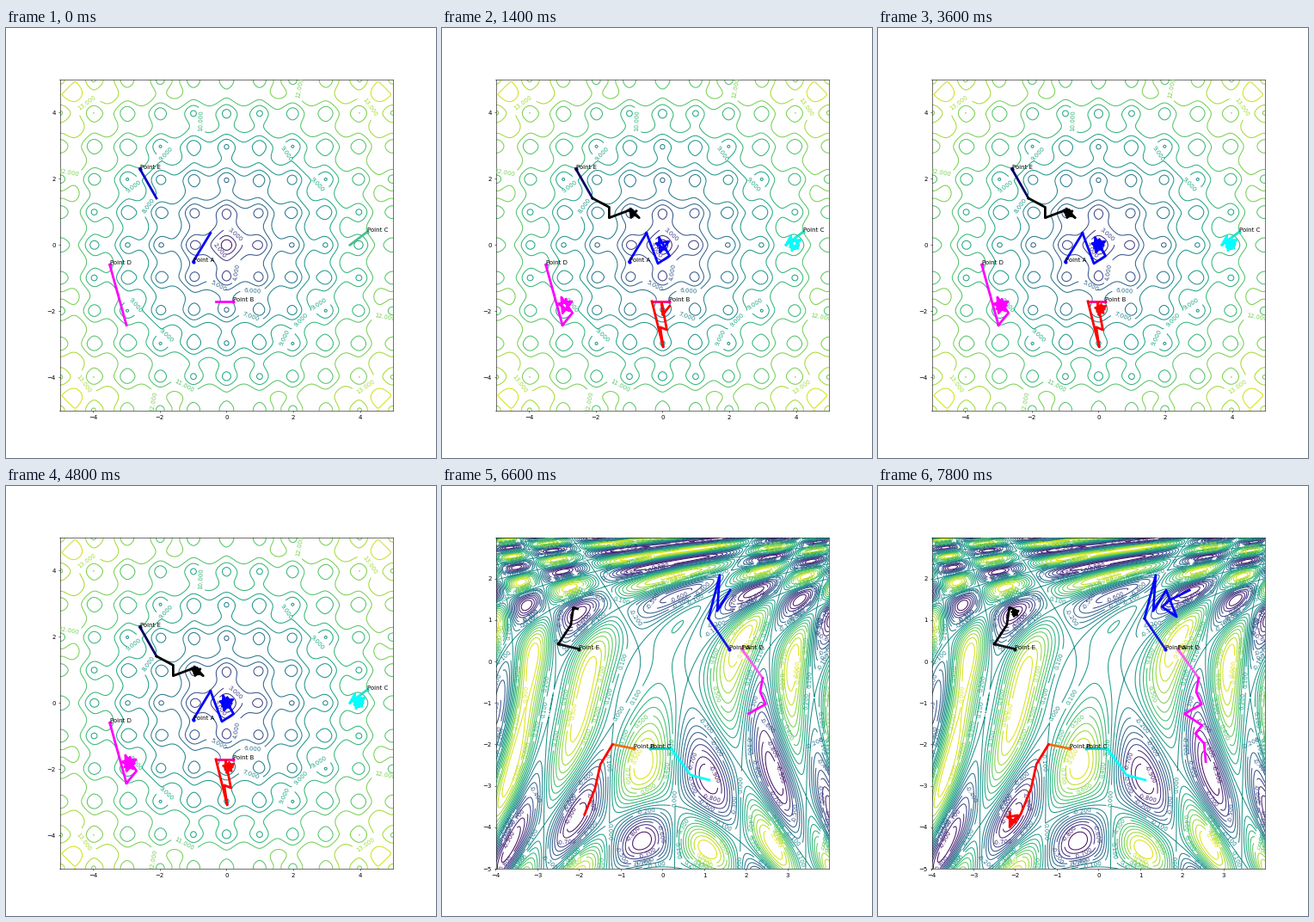
Write a matplotlib script that moves like this. It is 500 px wide and 500 px high and loops after 8000 ms.

```python
import numpy as np
import matplotlib.pyplot as plt
from matplotlib.animation import FuncAnimation
from matplotlib.colors import to_rgb

STEP_MS = 200
FRAMES = 40
SWITCH = 30      # step at which the second surface appears
MOVES = 25       # moves made before a search rests
GRID = 0.01
GOLDEN = np.pi * (3 - np.sqrt(5))
COLORS = ["blue", "red", "cyan", "magenta", "black"]


def ackley(x, y):
    bowl = -20 * np.exp(-0.2 * np.sqrt((x**2 + y**2) / 2))
    ripple = np.exp((np.cos(2 * np.pi * x) + np.cos(2 * np.pi * y)) / 2)
    return bowl - ripple + 20 + np.e


def waves(x, y):
    return np.sin(x**2 / 2 - y**2 / 4 + 3) * np.cos(2 * x + 1 - np.exp(y))


def search(keys, goal=None, radius=0.0):
    """Visit the key points, then close in on the goal from all sides."""
    keys = np.array(keys, float)
    left = MOVES + 1 - len(keys)
    if goal is None:
        return np.vstack([keys, np.repeat(keys[-1:], left, axis=0)])
    k = np.arange(left)
    angle = 2 + GOLDEN * k
    around = np.column_stack([np.cos(angle), np.sin(angle)])
    return np.vstack([keys, goal + radius * 0.93 ** k[:, None] * around])


class Track:
    def __init__(self, ax, name, color, tint, points):
        self.points = points
        # the first move starts in its tint and settles halfway to the colour
        self.tints = tint, (np.array(to_rgb(tint)) + to_rgb(color)) / 2
        style = dict(lw=4, zorder=6, solid_joinstyle="round")
        self.first, = ax.plot(*points[:2].T, **style)
        self.rest, = ax.plot([], [], color=color, **style)
        self.dot, = ax.plot(*points[:1].T, "o", ms=6, mew=0, zorder=7)
        ax.text(*points[0], "Point " + name, fontsize=10, zorder=8)

    def show(self, moves):
        tint = self.tints[moves > 1]
        self.first.set_color(tint)
        self.dot.set_color(tint)
        self.rest.set_data(*self.points[1:moves + 1].T)


class Scene:
    def __init__(self, fig, func, x0, y0, size, levels, tints, paths):
        self.ax = ax = fig.add_subplot()
        side = GRID * np.arange(round(size / GRID))
        x, y = np.meshgrid(x0 + side, y0 + side)
        lines = ax.contour(x, y, func(x, y), levels=levels)
        ax.clabel(lines, inline=True, fontsize=10, fmt="%1.3f")
        ax.set_autoscale_on(False)
        self.tracks = [Track(ax, *t) for t in zip("ABCDE", COLORS, tints, paths)]

    def show(self, moves):
        for track in self.tracks:
            track.show(moves)


fig = plt.figure(figsize=(10, 10), dpi=50, facecolor="white")
scenes = [
    Scene(fig, ackley, -5, -5, 10, np.arange(16),
          ["blue", "magenta", "#4abf8f", "magenta", "#0000cc"], [
              search([(-1, -.5), (-.48, .36), (-.14, -.56), (.21, -.33)],
                     (0, 0), .25),
              search([(.2, -1.7), (-.32, -1.7), (.02, -3.08), (-.07, -2.48),
                      (.13, -2.56), (.08, -2.3)], (.06, -1.93), .2),
              search([(4.22, .4), (3.7, 0)], (3.95, .05), .25),
              search([(-3.5, -.6), (-3, -2.42), (-2.7, -2.05)],
                     (-2.92, -1.82), .27),
              search([(-2.6, 2.3), (-2.1, 1.41), (-1.6, 1.14), (-1.6, .82),
                      (-1.02, 1.04), (-.7, .82)], (-.9, .96), .15),
          ]),
    Scene(fig, waves, -4, -5, 8, np.arange(-10, 11) / 10,
          ["#3030c0", "#e6e020", "#1fa5a0", "#ffb0f0", "#203038"], [
              search([(1.6, .3), (1.1, 1.04), (1.37, 2.08), (1.31, 1.22),
                      (1.62, 1.72), (1.87, 1.08), (1.52, 1.32), (1.7, 1.48),
                      (2.18, 1.72)]),
              search([(-.7, -2.1), (-1.2, -2), (-1.49, -2.48), (-1.62, -3.07),
                      (-1.87, -3.69), (-2.13, -4)], (-2.06, -3.78), .16),
              search([(-.3, -2.1), (.2, -2.1), (.44, -2.42), (.67, -2.74),
                      (1.12, -2.86)]),
              search([(1.9, .3), (2.4, -.4), (2.34, -.73), (2.47, -1.03),
                      (2.06, -1.26), (2.48, -1.54), (2.32, -1.74),
                      (2.53, -1.98), (2.57, -2.42)]),
              search([(-2, .3), (-2.5, .42), (-2.2, .88), (-2.14, 1.3)],
                     (-2, 1.18), .1),
          ]),
]


def update(i):
    active = int(i >= SWITCH)
    for k, scene in enumerate(scenes):
        scene.ax.set_visible(k == active)
    scenes[active].show(min(i - SWITCH * active + 1, MOVES))
    return []


anim = FuncAnimation(fig, update, frames=FRAMES, interval=STEP_MS,
                     init_func=lambda: update(0), repeat=True)
plt.show()
```
